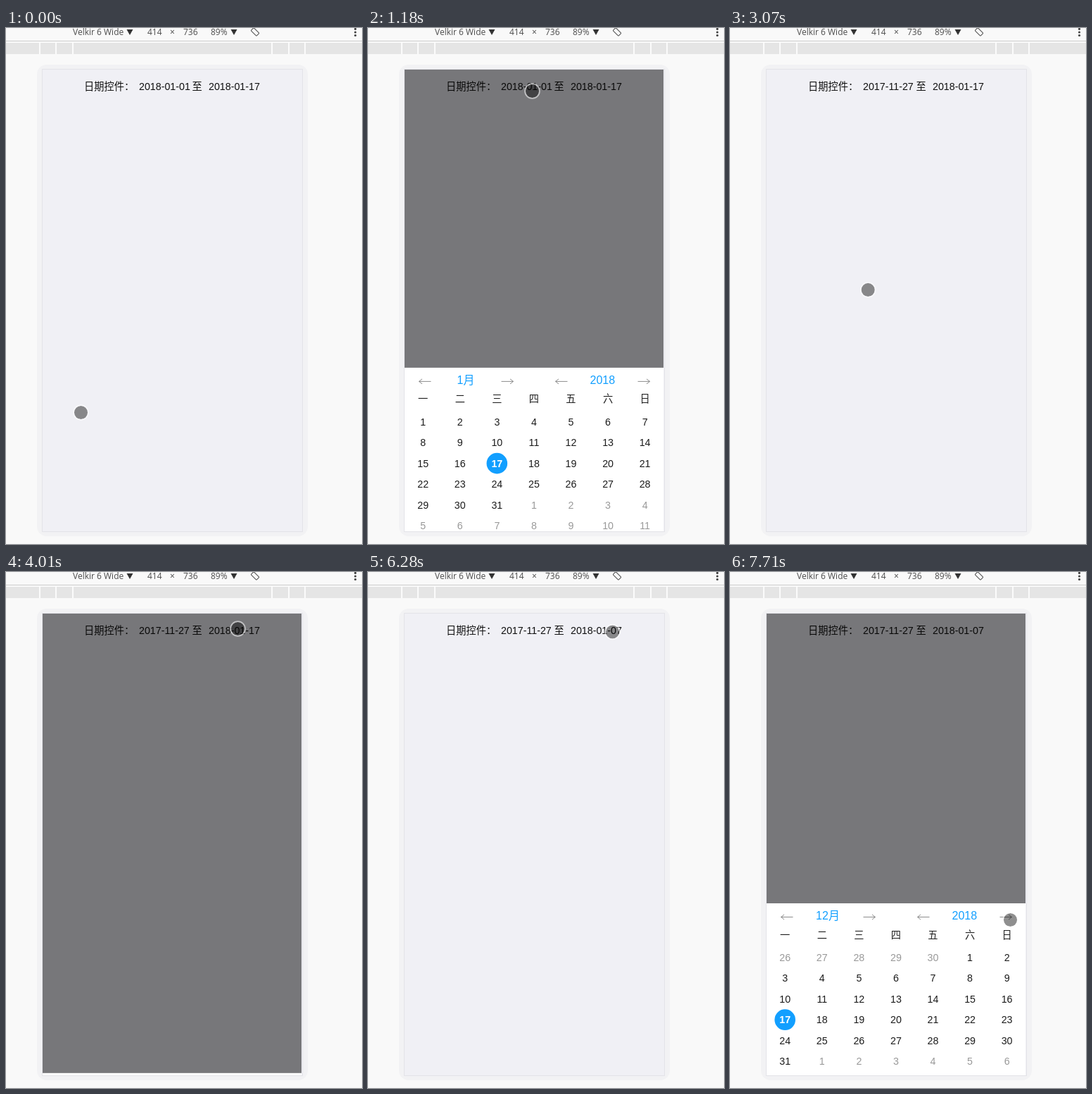
These frames come from a looping animation (506x732 px, 8 s). An HTML page with a canvas:

```html
<!DOCTYPE html>
<html lang="zh">
<head>
<meta charset="utf-8">
<title>日期控件</title>
<style>
  html, body { margin: 0; width: 100%; height: 100%; overflow: hidden; background: #f9f9f9; }
  canvas { display: block; width: 506px; height: 732px; }
</style>
</head>
<body>
<canvas id="stage" width="506" height="732"></canvas>
<script>
const ctx = document.getElementById('stage').getContext('2d');
const LOOP = 8000;
const SANS = '"Liberation Sans", Arial, "Noto Sans CJK SC", "Noto Sans CJK", sans-serif';
const UI = '"Open Sans", "Noto Sans", sans-serif';
const BLUE = '#129fff';
const SCREEN = { x: 52, y: 59, w: 368, h: 655 };
const PANEL_TOP = 470, PANEL_H = 244, SLIDE = 400;

// When the picker opens, when its panel starts to slide, when it closes
const openings = [
  { at: 890, slide: 890, close: 2950 },
  { at: 4010, slide: 4000, close: 5710 },
  { at: 6490, slide: 6482, close: LOOP }
];

// Month on show until a given time, with the index of the selected cell
const views = [
  { until: 2050, year: 2018, month: 1, sel: 16 },
  { until: 2950, year: 2017, month: 12, sel: 20 },
  { until: 5710, year: 2017, month: 12, sel: 0 },
  { until: 7710, year: 2017, month: 12, sel: 41 },
  { until: LOOP, year: 2018, month: 12, sel: 21 }
];

// Pointer path: time, x, y
const path = [
  [0, 106.5, 545.5], [60, 106.5, 545.5], [640, 233.5, 89.5], [1200, 233.5, 89.5],
  [1690, 69, 492], [1720, 68, 492], [1800, 75, 490], [1860, 73.5, 488.5],
  [2170, 73.5, 488.5], [2330, 112, 505], [2480, 138, 530], [2710, 80, 556],
  [2920, 80, 556], [3160, 250, 286], [3290, 250, 286], [3700, 329.5, 80.5],
  [4300, 329.5, 80.5], [4790, 377, 630], [4850, 377.5, 634], [5050, 382.5, 692],
  [5170, 398, 709], [5300, 398, 709], [5530, 394, 694.5], [5690, 394, 694.5],
  [6280, 347.5, 85], [6690, 347.5, 85], [7250, 398, 499], [7290, 398, 499],
  [7370, 398.5, 493.5], [LOOP, 398.5, 493.5]
];

function slope(i, k) {
  const a = path[i], b = path[i + 1];
  return a && b ? (b[k] - a[k]) / (b[0] - a[0]) : 0;
}

// Harmonic mean keeps the curve from overshooting
function tangent(i, k) {
  const a = slope(i - 1, k), b = slope(i, k);
  return a * b > 0 ? 2 * a * b / (a + b) : 0;
}

function pointer(t) {
  let i = 0;
  while (i < path.length - 2 && t >= path[i + 1][0]) i++;
  const d = path[i + 1][0] - path[i][0], u = (t - path[i][0]) / d, v = 1 - u;
  return [1, 2].map(k =>
    path[i][k] * (1 + 2 * u) * v * v + tangent(i, k) * d * u * v * v +
    path[i + 1][k] * u * u * (3 - 2 * u) - tangent(i + 1, k) * d * u * u * v);
}

// cubic-bezier(.25, .1, .25, 1)
function ease(x) {
  if (x <= 0) return 0;
  if (x >= 1) return 1;
  let lo = 0, hi = 1, s = 0.5;
  for (let n = 0; n < 20; n++) {
    s = (lo + hi) / 2;
    if (0.75 * s * (1 - s) + s ** 3 < x) lo = s; else hi = s;
  }
  return 0.3 * s * (1 - s) ** 2 + 3 * s * s * (1 - s) + s ** 3;
}

function rect(x, y, w, h, color) {
  ctx.fillStyle = color;
  ctx.fillRect(x, y, w, h);
}

function disc(x, y, r, color) {
  ctx.fillStyle = color;
  ctx.beginPath();
  ctx.arc(x, y, r, 0, Math.PI * 2);
  ctx.fill();
}

function text(str, x, y, size, color, align = 'left', family = SANS, weight = '') {
  ctx.font = `${weight} ${size}px ${family}`;
  ctx.fillStyle = color;
  ctx.textAlign = align;
  ctx.fillText(str, x, y);
}

function line(color, width, ...pts) {
  ctx.strokeStyle = color;
  ctx.lineWidth = width;
  ctx.beginPath();
  pts.forEach(([x, y], i) => i ? ctx.lineTo(x, y) : ctx.moveTo(x, y));
  ctx.stroke();
}

function dropMark(x) {
  ctx.fillStyle = '#333';
  ctx.beginPath();
  ctx.moveTo(x, 2);
  ctx.lineTo(x + 9, 2);
  ctx.lineTo(x + 4.5, 10);
  ctx.fill();
}

function rotateIcon(x, y) {
  ctx.save();
  ctx.translate(x, y);
  ctx.rotate(-Math.PI / 4);
  ctx.strokeStyle = '#5a5a5a';
  ctx.lineWidth = 1.1;
  ctx.beginPath();
  ctx.roundRect(-2.8, -5.5, 5.6, 11, 1);
  ctx.stroke();
  ctx.restore();
  for (const a of [-0.2, Math.PI - 0.2]) {
    ctx.beginPath();
    ctx.arc(x, y, 6.5, a - 1.2, a);
    ctx.stroke();
  }
}

function toolbar() {
  const label = (s, x) => text(s, x, 10, 12, '#4c4c4c', 'left', UI);
  label('Velkir 6 Wide', 95);
  label('414', 201);
  label('×', 233);
  label('736', 252);
  label('89%', 291);
  dropMark(171.5);
  dropMark(319.5);
  rotateIcon(354, 5.5);
  for (const y of [1.5, 6, 10.5]) disc(496.5, y, 1.6, '#444');
  rect(0, 18, 506, 1, '#cccccc');
  rect(0, 21, 506, 16, '#e5e5e5');
  for (const x of [47, 70, 94, 377, 401, 424]) rect(x, 21, 2, 16, '#fbfbfb');
}

function phone(t) {
  ctx.fillStyle = '#f2f2f4';
  ctx.beginPath();
  ctx.roundRect(44, 52, 385, 669, 14);
  ctx.fill();
  rect(51, 58, 371, 657, '#e3e3e8');
  rect(52, 59, 369, 655, '#f0f0f5');
  const ink = '#111';
  text('日期控件：', 111, 88, 14.24, ink);
  text(t < 2950 ? '2018-01-01' : '2017-11-27', 189, 88, 14.24, ink);
  text('至', 264.5, 88, 14.24, ink);
  text(t < 5710 ? '2018-01-17' : '2018-01-07', 288, 88, 14.24, ink);
}

function arrow(x, y, dir) {
  const tip = x + 8.5 * dir, back = tip - 4.5 * dir;
  line('#8c8c8c', 1, [x - 8.5 * dir, y], [tip, y]);
  line('#8c8c8c', 1, [back, y - 3.5], [tip, y], [back, y + 3.5]);
}

function panel(t) {
  const { year, month, sel } = views.find(v => t < v.until);
  rect(SCREEN.x, PANEL_TOP, SCREEN.w, PANEL_H, '#fff');
  arrow(81, 489.5, -1);
  arrow(198, 489.5, 1);
  arrow(275, 489.5, -1);
  arrow(392, 489.5, 1);
  text(month + '月', 139, 493, 16.02, BLUE, 'center');
  text(year, 333.3, 493, 16.02, BLUE, 'center');

  const colX = i => 78.2 + 52.57 * i;
  [...'一二三四五六日'].forEach((c, i) => text(c, colX(i), 519.5, 14.24, '#222', 'center'));

  const lead = (new Date(year, month - 1, 1).getDay() + 6) % 7;
  for (let i = 0; i < 42; i++) {
    const date = new Date(year, month - 1, 1 - lead + i);
    const x = colX(i % 7), y = 546.9 + 29.42 * Math.floor(i / 7);
    const own = date.getMonth() === month - 1, on = i === sel;
    if (on) disc(x, y, 14.8, BLUE);
    text(date.getDate(), x, Math.round(y + 5), 14.24,
      on ? '#fff' : own ? '#1c1c1c' : '#999', 'center', SANS, on ? 'bold' : '');
  }
}

function picker(t) {
  const o = openings.find(p => t >= p.at && t < p.close);
  if (!o) return;
  ctx.save();
  ctx.beginPath();
  ctx.rect(SCREEN.x, SCREEN.y, SCREEN.w, SCREEN.h);
  ctx.clip();
  rect(SCREEN.x, SCREEN.y, SCREEN.w, SCREEN.h, 'rgba(0,0,0,.5)');
  ctx.translate(0, PANEL_H * (1 - ease((t - o.slide) / SLIDE)));
  panel(t);
  ctx.restore();
}

function cursor(t) {
  const [x, y] = pointer(t);
  disc(x, y, 9.6, 'rgba(0,0,0,.44)');
  ctx.strokeStyle = 'rgba(255,255,255,.55)';
  ctx.lineWidth = 1.8;
  ctx.beginPath();
  ctx.arc(x, y, 10.4, 0, Math.PI * 2);
  ctx.stroke();
}

function draw(now) {
  const t = now % LOOP;
  rect(0, 0, 506, 732, '#f9f9f9');
  toolbar();
  phone(t);
  picker(t);
  cursor(t);
}

let start;
function tick(now) {
  start ??= now;
  draw(now - start);
  requestAnimationFrame(tick);
}
draw(0);
requestAnimationFrame(tick);
</script>
</body>
</html>
```
